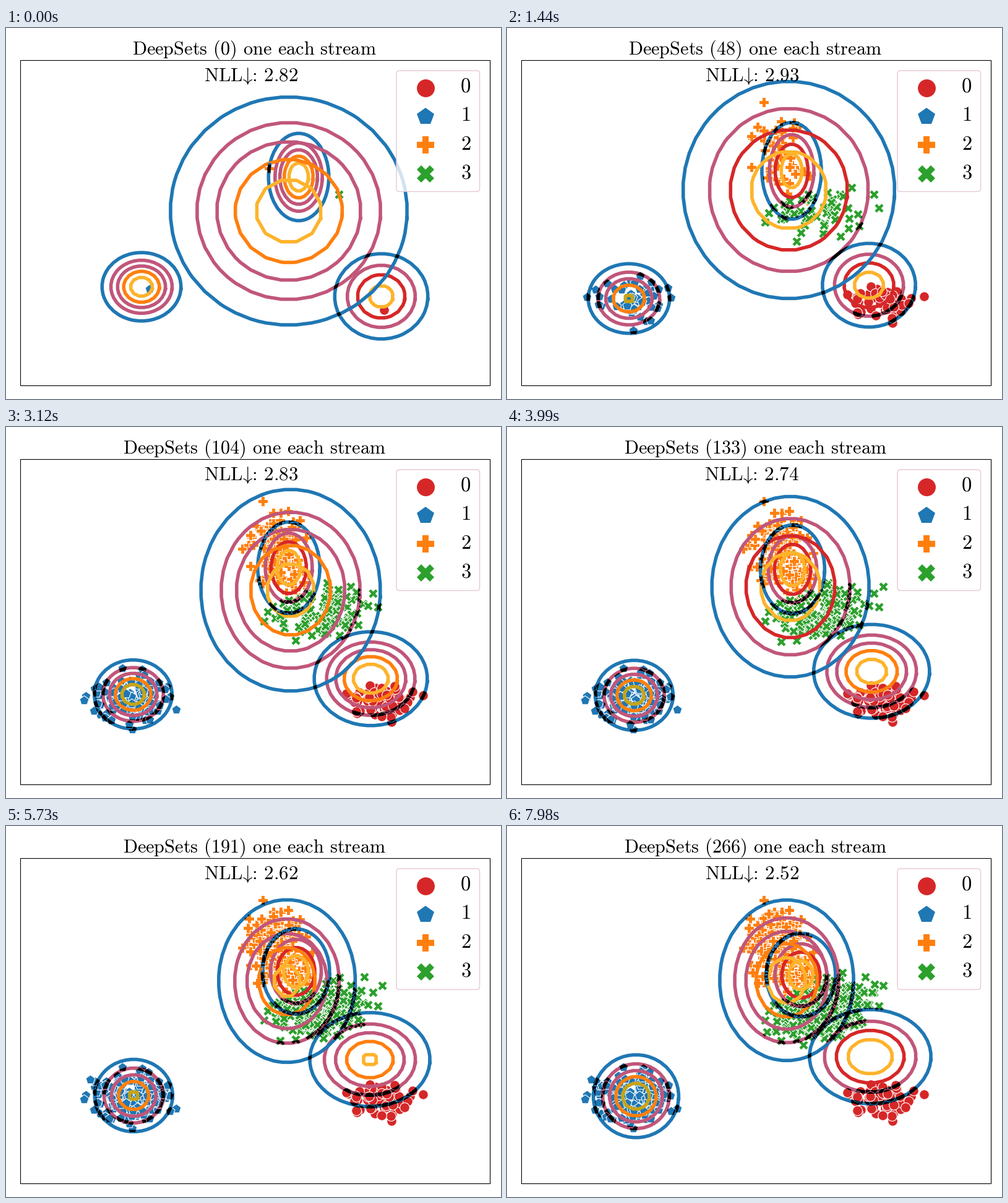
Recreate the animation shown at these times as a matplotlib script. Size 800 by 600 pixels, loop 8 s.

```python
import numpy as np
import matplotlib.pyplot as plt
from matplotlib.animation import FuncAnimation
from matplotlib.patches import FancyBboxPatch, Rectangle
from matplotlib.path import Path

plt.rcParams["mathtext.fontset"] = "cm"

FRAMES, INTERVAL = 267, 30
BLUE, PINK, RED = "#1f77b4", "#c1567a", "#d62728"
ORANGE, GREEN, YELLOW, OLIVE = "#ff7f0e", "#2ca02c", "#fdb32b", "#c6a41a"
COLORS = [RED, BLUE, ORANGE, GREEN]
MARKERS = ["o", "p", "P", "X"]
LINE = 4.0
GRID = 0.17        # spacing of the contour grid, in widths of a Gaussian
PEAK = 231500      # density at the centre times width times height
NICE = np.outer([1, 10], [1, 1.5, 2, 2.5, 3, 4, 5, 6, 8]).ravel()

# Key states of each fitted Gaussian: step, centre x, centre y, width, height
TRACKS = [np.array(keys).T for keys in (
    [(0, 606.5, 434, 61.9, 56.7), (18, 584, 415, 59.3, 53), (48, 585, 416, 60.7, 54.6),
     (104, 589.5, 407, 68.5, 56.9), (165, 589, 382, 74.4, 58.7), (220, 587, 373, 77.7, 60.3)],
    [(0, 219, 418.5, 48.3, 41.9), (18, 196, 437, 48.9, 42.6), (48, 197, 437.5, 51.5, 44.1),
     (104, 205.5, 432.5, 47.4, 42.1), (165, 205.5, 435.5, 48.6, 44.3),
     (266, 208.5, 437, 51.6, 50.1)],
    [(0, 473, 241, 36.4, 52.7), (18, 467, 240.5, 37.4, 59.7), (48, 460, 231, 38.3, 62.2),
     (104, 457, 227.5, 39.5, 58.1), (165, 466.5, 233, 42.3, 54.5), (266, 475, 241, 44.5, 53.7)],
    [(0, 457, 296, 145, 139.7), (18, 458.5, 278.5, 145.5, 148.6), (48, 455.5, 262, 135.8, 139.5),
     (104, 460, 264, 110.3, 124), (165, 456, 252, 88.6, 104.8), (220, 452, 249.5, 81.8, 98.2)],
)]


def cloud(seed, count, first, mean, spread, tilt=0.0):
    """Samples of a truncated, sheared Gaussian in order of arrival."""
    rng = np.random.default_rng(seed)
    r = np.sqrt(-2 * np.log(1 - 0.96 * rng.random(count)))
    t = 2 * np.pi * rng.random(count)
    x, y = r * np.cos(t), r * np.sin(t)
    pts = np.column_stack([x + tilt * y, y]) * spread + mean
    pts[0] = first
    return pts


CLOUDS = [
    cloud(3, 63, (611, 456), (608, 442), (29, 16)),
    cloud(5, 176, (232, 422), (204, 436), (32, 21)),
    cloud(7, 215, (425, 227), (441, 206), (25, 35), 0.25),
    cloud(9, 267, (538, 269), (514, 297), (37, 24), -0.4),
]


def ring(rho):
    """Unit directions where a circle of radius rho crosses the grid lines."""
    base = np.arccos(np.arange(GRID / 2, rho, GRID) / rho)
    quarter = np.concatenate([base, np.pi / 2 - base])
    t = np.sort(np.concatenate([quarter + j * np.pi / 2 for j in range(4)]))
    t = np.append(t, t[0])
    return np.column_stack([np.cos(t), np.sin(t)])


def contours(cx, cy, w, h):
    """Level lines of a Gaussian at evenly spaced round densities."""
    peak = PEAK / (w * h)
    top = peak * np.exp(-GRID ** 2 / 2)
    step = NICE[NICE >= top / 6][0]
    lines = []
    for level in np.arange(step, top, step):
        rho = np.sqrt(np.log(peak / level))
        lines.append((cx, cy) + ring(rho) * rho * (w, h))
    return lines


def band(line, half=2.8):
    """Closed strip covered by a level line."""
    d = line - line[:-1].mean(axis=0)
    off = half * d / np.hypot(*d.T)[:, None]
    return [Path(line + off, closed=True), Path((line - off)[::-1], closed=True)]


def palette(count, last):
    if count <= 4:
        return [BLUE, PINK, RED, last]
    return [BLUE, PINK, PINK, ORANGE, last, last]


def tex(s):
    return r"$\mathrm{" + s.replace(" ", r"\hspace{0.38}") + "}$"


fig = plt.figure(figsize=(8, 6), dpi=100, facecolor="white")
ax = fig.add_axes([0, 0, 1, 1])
ax.set_xlim(0, 800)
ax.set_ylim(600, 0)
ax.axis("off")


def dots(kind, face, edge, z):
    return ax.scatter([], [], s=128, marker=MARKERS[kind], color=face,
                      edgecolors=edge, linewidths=0.8, zorder=z)


clouds = [dots(n, COLORS[n], "white", 2) for n in range(4)]
rings = [[ax.plot([], [], lw=LINE, solid_joinstyle="round", zorder=3 + 0.1 * g)[0]
          for _ in range(6)] for g in range(4)]
# Markers turn black under the two outer lines; orange stays pink under the second
shades = [(n, level, dots(n, "black", tone, 4))
          for level, tone in enumerate([BLUE, PINK])
          for n in range(4) if (n, level) != (2, 1)]
crossings = [ax.plot([], [], color="black", lw=LINE, zorder=4)[0] for _ in range(2)]

ax.add_patch(Rectangle((23, 52), 759, 526, fill=False, ec="black", lw=0.8, zorder=5))
ax.add_patch(FancyBboxPatch((636, 74), 124.5, 185.5,
                            boxstyle="round,pad=5,rounding_size=5",
                            fc=(1, 1, 1, 0.8), ec="#e6c8d4", lw=1, zorder=6))
for n in range(4):
    y = 46.4 * n
    ax.plot(677.5, 96.5 + y, marker=MARKERS[n], color=COLORS[n], ms=20.8, mew=0, zorder=7)
    ax.text(743, 104 + y, tex(str(n)), fontsize=23.5, ha="center", va="baseline", zorder=7)
title = ax.text(401, 43, "", fontsize=21.8, ha="center", va="baseline", zorder=7)
score = ax.text(396, 85.5, "", fontsize=22.4, ha="center", va="baseline", zorder=7)


def draw(i):
    levels = [contours(*(np.interp(i, track[0], row) for row in track[1:]))
              for track in TRACKS]
    for g, lines in enumerate(levels):
        dense = g == 1 and i >= 40
        tones = palette(len(lines), OLIVE if dense else YELLOW)
        for n, artist in enumerate(rings[g]):
            if n < len(lines):
                artist.set_data(*lines[n].T)
                artist.set_color(tones[n])
            else:
                artist.set_data([], [])

    for pts, artist in zip(CLOUDS, clouds):
        artist.set_offsets(pts[:i + 1])
    strips = [Path.make_compound_path(*(p for lines in levels for p in band(lines[k])))
              for k in range(2)]
    for n, k, artist in shades:
        artist.set_offsets(CLOUDS[n][:i + 1])
        artist.set_clip_path(strips[k], ax.transData)

    red_strip = Path.make_compound_path(*band(levels[0][0]))
    for artist, line in zip(crossings, levels[3]):
        artist.set_data(*line.T)
        artist.set_clip_path(red_strip, ax.transData)

    nll = np.interp(i, [0, 48, 104, 165, 266], [2.82, 2.93, 2.83, 2.65, 2.52])
    title.set_text(tex(f"DeepSets ({i}) one each stream"))
    score.set_text(r"$\mathrm{NLL}\hspace{-0.2}\downarrow\hspace{-0.4}:\hspace{0.18}"
                   rf"\mathrm{{{nll:.2f}}}$")
    return []


anim = FuncAnimation(fig, draw, frames=FRAMES, init_func=lambda: draw(0),
                     interval=INTERVAL, repeat=True, repeat_delay=0, blit=False)
plt.show()
```
